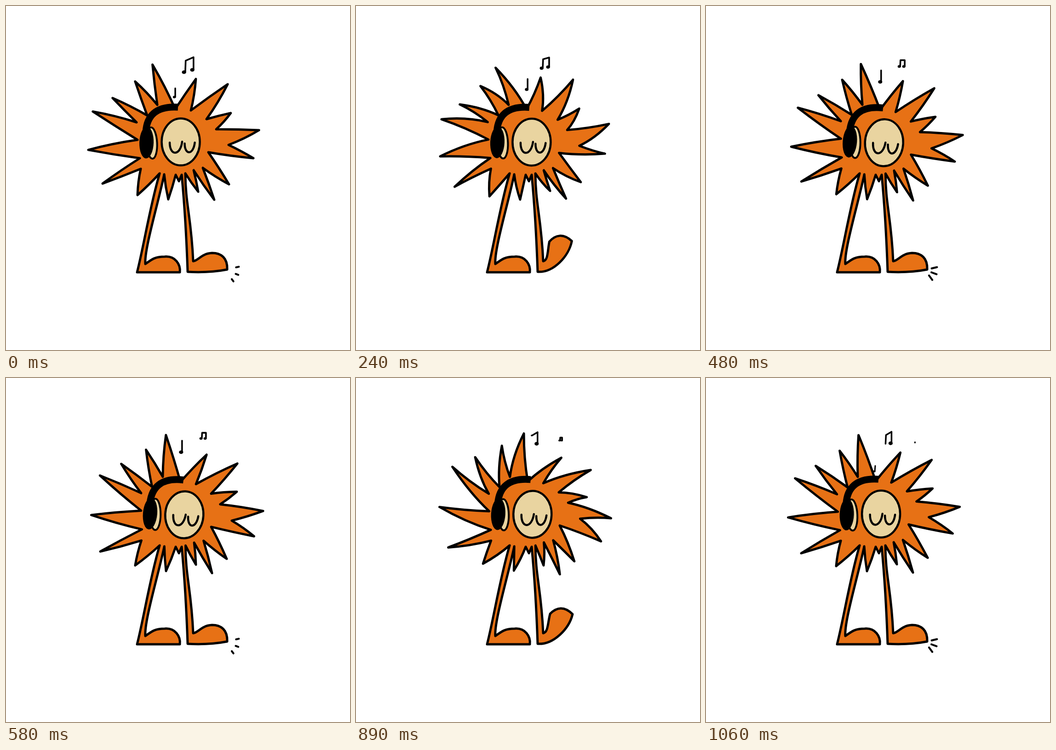
Recreate the animation shown at these times as an HTML page with a canvas. Size 748 by 748 pixels, loop 1.16 s.

```html
<!DOCTYPE html>
<html lang="en">
<head>
<meta charset="utf-8">
<title>Sun with headphones</title>
<style>
html, body { margin: 0; width: 100%; height: 100%; overflow: hidden; background: #fff; }
canvas { display: block; width: 748px; height: 748px; }
</style>
</head>
<body>
<canvas id="stage" width="748" height="748"></canvas>
<script>
const ctx = document.getElementById('stage').getContext('2d');
const ORANGE = '#e77115', CREAM = '#e9d4a0', BLACK = '#000';
const CX = 370, CY = 290;

// Fourteen held drawings: two foot taps for one sway of the rays
const holds = [70, 100, 70, 100, 70, 70, 100, 70, 100, 70, 70, 100, 70, 100];
const LOOP = holds.reduce((a, b) => a + b);
const sway = [-0.42, -1, -1.02, -0.05, 1, 1, 0];

// Upright rays clockwise: tip, then the notch that follows
const rays = [
  [422, 162, 402, 227], [490, 178, 436, 246], [492, 240, 457, 268], [551, 280, 484, 302],
  [536, 338, 440, 318], [482, 391, 428, 352], [450, 423, 408, 357], [415, 405, 390, 364],
  [350, 420, 344, 366], [283, 409, 293, 354], [207, 381, 291, 331], [178, 303, 286, 291],
  [193, 218, 284, 253], [238, 191, 307, 238], [290, 158, 329, 215], [331, 124, 368, 224]
];

// Flat right foot, ankle to toe to heel: x, y, share of the lift
const foot = [
  [418, 554, 0.1], [425, 538, 0.5], [448, 537, 1],
  [468, 537, 1], [482, 548, 1], [481, 573, 1],
  [460, 577, 0.7], [430, 580, 0], [395, 578, 0]
];

const clamp = v => Math.max(0, Math.min(1, v));
const lerp = (a, b, t) => a + (b - a) * t;
function turned(x, y, a, ox = CX, oy = CY) {
  const c = Math.cos(a), s = Math.sin(a);
  return [ox + (x - ox) * c - (y - oy) * s, oy + (x - ox) * s + (y - oy) * c];
}

function poseAt(i) {
  const p = i / 2 - clamp((i - 6) / 3) / 2;
  const k = Math.floor(p), beat = i % 7;
  const dx = 7.8 * Math.sin(Math.PI * p / 7) ** 3;
  return {
    p, dx, dy: dx / 4, turn: dx * 0.007,
    sway: lerp(sway[k], sway[Math.min(k + 1, 6)], p - k),
    lift: 0.87 * Math.sin(Math.PI * (beat / 6) ** 1.2),
    tap: beat === 6 ? [15, 27] : beat === 0 ? [25, 31] : null
  };
}

function stroke(width, ...lines) {
  ctx.lineWidth = width;
  ctx.beginPath();
  for (const [x, y, ...rest] of lines) {
    ctx.moveTo(x, y);
    for (let i = 0; i < rest.length; i += 2) ctx.lineTo(rest[i], rest[i + 1]);
  }
  ctx.stroke();
}
function oval(x, y, rx, ry, fill, line, tilt = 0) {
  ctx.beginPath();
  ctx.ellipse(x, y, rx, ry, tilt, 0, Math.PI * 2);
  ctx.fillStyle = fill;
  ctx.fill();
  if (line) { ctx.lineWidth = line; ctx.stroke(); }
}

// Points low on the body stay with the legs
function follow(x, y, angle, { dx, dy }) {
  const grip = clamp((370 - y) / 50);
  const [tx, ty] = turned(x, y, angle);
  return [tx + dx * grip, ty + dy * grip];
}
const notchAt = ([, , x, y], pose) => follow(x, y, pose.turn * clamp((370 - y) / 50), pose);
function tipAt([x, y], pose) {
  const low = y - CY;
  const swing = 0.13 - low * (low > 0 ? 0.0006 : 0.0003);
  return follow(x, y, pose.sway * swing, pose);
}

// Two slightly swollen edges that lag behind the swinging tip
function ray(from, to, tip, rest, lag) {
  const edge = (p, q) => [0, 1].map(i =>
    (p[i] + tip[i]) / 2 + (rest[i] - tip[i]) * lag + (p[i] - q[i]) * 0.06);
  ctx.quadraticCurveTo(...edge(from, to), ...tip);
  ctx.quadraticCurveTo(...edge(to, from), ...to);
}

function rightLeg(lift) {
  const f = foot.map(([x, y, share]) => turned(x, y, -lift * share, 407, 555));
  ctx.bezierCurveTo(390, 430, 403, 460, 407, 555);
  for (let i = 0; i < f.length; i += 3) ctx.bezierCurveTo(...f[i], ...f[i + 1], ...f[i + 2]);
  ctx.bezierCurveTo(393, 520, 388, 430, 382, 367);
  ctx.lineTo(376, 381);
  ctx.lineTo(369, 367);
}
function leftLeg() {
  ctx.bezierCurveTo(332, 425, 300, 530, 303, 561);
  ctx.bezierCurveTo(318, 550, 325, 545, 345, 545);
  ctx.bezierCurveTo(368, 543, 380, 562, 378, 579);
  ctx.lineTo(285, 579);
  ctx.bezierCurveTo(300, 520, 312, 440, 334, 364);
}

function body(pose) {
  let from = notchAt(rays[rays.length - 1], pose);
  ctx.beginPath();
  ctx.moveTo(...from);
  rays.forEach((r, i) => {
    const to = notchAt(r, pose);
    ray(from, to, tipAt(r, pose), tipAt(r, { ...pose, sway: 0 }), Math.abs(pose.sway) * 0.22);
    from = to;
    if (i === 7) { rightLeg(pose.lift); from = [369, 367]; }
    if (i === 8) { leftLeg(); from = [334, 364]; }
  });
  ctx.closePath();
  ctx.fillStyle = ORANGE;
  ctx.fill();
  ctx.lineWidth = 5;
  ctx.stroke();
}

function eye(x, y, w, h) {
  ctx.beginPath();
  ctx.moveTo(x, y);
  ctx.bezierCurveTo(x, y + h * 1.35, x + w * 0.85, y + h * 1.35, x + w, y - 2);
  ctx.lineWidth = 4.5;
  ctx.stroke();
}

function head({ dx, dy, turn }) {
  ctx.save();
  ctx.translate(380 + dx, 296 + dy);
  ctx.rotate(turn);
  ctx.translate(-380, -296);
  oval(317, 298, 11.5, 34, CREAM, 4, -0.05);
  oval(305.5, 297, 15.5, 34.5, BLACK, 0, 0.03);
  ctx.lineCap = 'butt';
  ctx.lineWidth = 15;
  ctx.beginPath();
  ctx.moveTo(304, 274);
  ctx.bezierCurveTo(306, 240, 325, 217, 374, 220);
  ctx.stroke();
  ctx.lineCap = 'round';
  oval(380, 295.5, 41.5, 51, CREAM, 4.5);
  eye(356, 297, 27, 22);
  eye(388.5, 299, 22, 19);
  ctx.restore();
}

// The pair arcs away to the right and shrinks to a dot
function pairNote(p) {
  const x = 396 + 9.7 * p, y = 131.5 + 1.1 * (p - 3) ** 2;
  const k = 1 - 0.15 * p, tilt = 2.5 * clamp(1 - p / 3);
  const gap = 9 * k, r = 4.6 * Math.sqrt(k) * clamp(6.2 - p), h = 25 * k;
  stroke(3.6 * Math.min(1, k * 4), [x - gap + r * 0.6, y + tilt, x - gap + r * 0.8, y + tilt - h,
    x + gap + r * 0.6, y - tilt * 2 - h, x + gap + r * 0.6, y - tilt]);
  oval(x - gap, y + tilt, r, r * 0.85, BLACK);
  oval(x + gap, y - tilt, r, r * 0.85, BLACK);
}

// The single note rises, then grows a flag and a second stem
function singleNote(p) {
  const x = 366 + 2.6 * p + 0.55 * p * p, y = Math.max(142, 198 - 11 * p);
  const r = Math.min(4.6, 3.2 + 0.45 * p), h = Math.min(25, 19 + 2.5 * p);
  stroke(3.5, [x + 2, y, x + 2, y - h]);
  oval(x, y, r, r * 0.85, BLACK);
  if (p >= 5) stroke(3.5, [x + 2, y - h, x - 10, y - h + 7, x - 11, y - h + 7 + 19 * (p - 5)]);
}

function newNote() {
  stroke(3, [367, 203, 368, 191]);
  oval(366, 203, 2.6, 2.2, BLACK);
}

function taps([near, far]) {
  stroke(4.2, ...[-0.23, 0.35, 0.93].map(a => {
    const c = Math.cos(a), s = Math.sin(a);
    return [476 + near * c, 574 + near * s, 476 + far * c, 574 + far * s];
  }));
}

function draw(i) {
  const pose = poseAt(i);
  ctx.fillStyle = '#fff';
  ctx.fillRect(0, 0, 748, 748);
  ctx.strokeStyle = BLACK;
  ctx.lineCap = ctx.lineJoin = 'round';
  body(pose);
  head(pose);
  pairNote(pose.p);
  singleNote(pose.p);
  if (pose.p === 6) newNote();
  if (pose.tap) taps(pose.tap);
}

const start = performance.now();
function tick(now) {
  let t = Math.max(0, now - start) % LOOP, i = 0;
  while (t >= holds[i]) t -= holds[i++];
  draw(i);
  requestAnimationFrame(tick);
}
tick(start);
</script>
</body>
</html>
```
